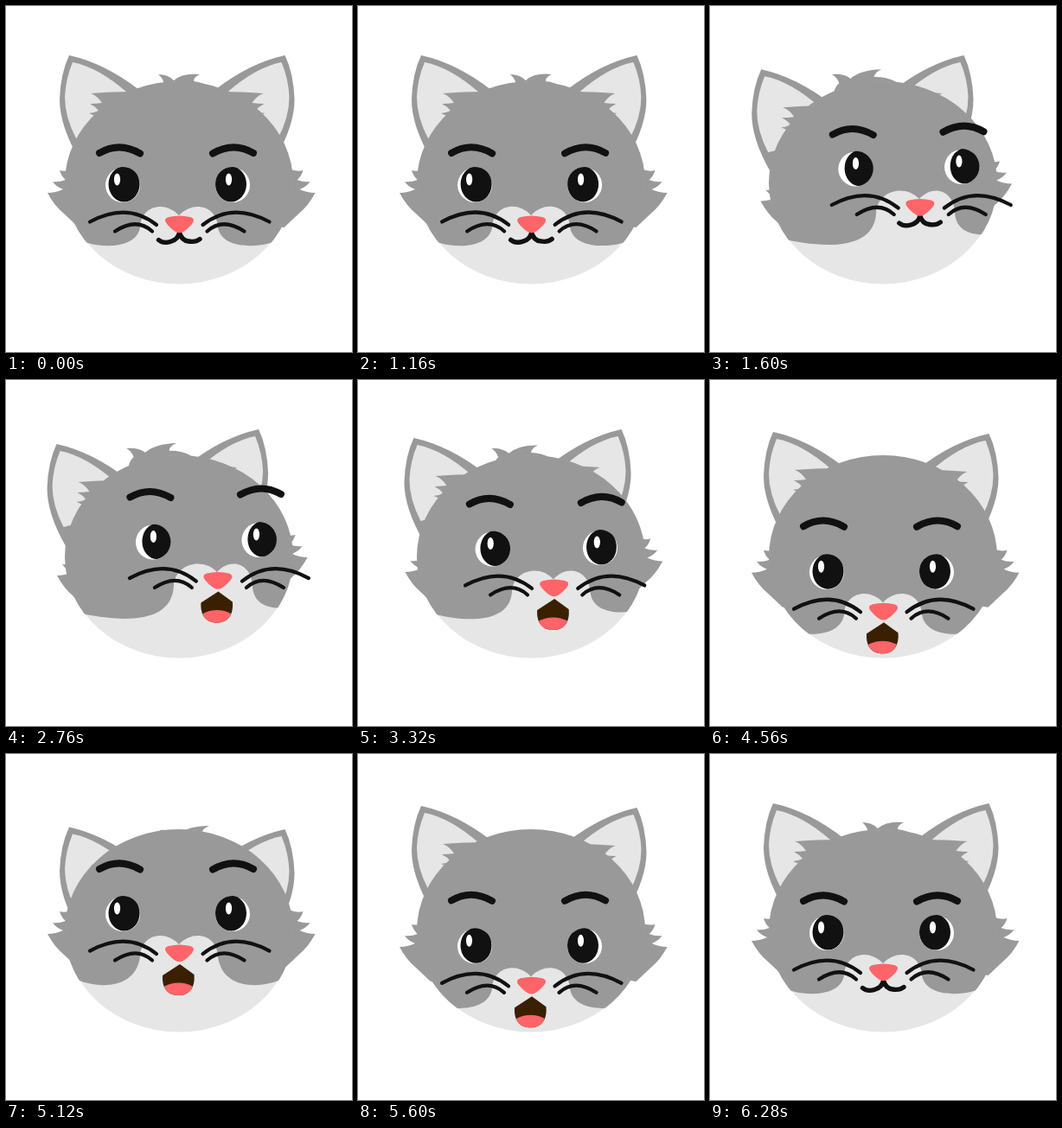
Recreate the animation shown at these times as an HTML page with a canvas. Size 400 by 400 pixels, loop 6.64 s.

```html
<!DOCTYPE html>
<html lang="en">
<head>
<meta charset="utf-8">
<title>Cat</title>
<style>
html, body { margin: 0; width: 100%; height: 100%; overflow: hidden; background: #fff; }
canvas { display: block; width: 100vmin; height: 100vmin; }
</style>
</head>
<body>
<canvas id="stage"></canvas>
<script>
const canvas = document.getElementById('stage');
const ctx = canvas.getContext('2d');
const LOOP = 6640, STEP = 40;
const GREY = '#999', LIGHT = '#e6e6e6', BLACK = '#111', PINK = '#ff6468', DARK = '#3a2000';

const clamp = v => Math.min(1, Math.max(0, v));
const smooth = p => p * p * (3 - 2 * p);
const cubic = p => p < 0.5 ? 4 * p ** 3 : 1 - 4 * (1 - p) ** 3;
const easeOut = p => 1 - (1 - p) ** 2;
const span = (t, a, b) => clamp((t - a) / (b - a));
const mix = (a, b, p) => a + (b - a) * p;

// A pose is how far the head is turned right, bent down and raised up
const FRONT = { right: 0, down: 0, up: 0 };
const RIGHT = { ...FRONT, right: 1 };
const DOWN = { ...FRONT, down: 1 };
const UP = { ...FRONT, up: 1 };
const keys = [
  { time: 1100, pose: FRONT },
  { time: 1750, pose: RIGHT, ease: cubic },
  { time: 2720, pose: RIGHT, ease: cubic },
  { time: 4080, pose: FRONT, ease: smooth },
  { time: 4660, pose: DOWN, ease: cubic },
  { time: 5150, pose: UP, ease: cubic },
  { time: 5650, pose: DOWN, ease: cubic },
  { time: 6140, pose: FRONT, ease: cubic }
];
let pose = FRONT;

function poseAt(t) {
  const i = keys.findIndex(k => k.time > t);
  if (i < 1) return FRONT;
  const a = keys[i - 1], b = keys[i], p = b.ease(span(t, a.time, b.time));
  return {
    right: mix(a.pose.right, b.pose.right, p),
    down: mix(a.pose.down, b.pose.down, p),
    up: mix(a.pose.up, b.pose.up, p)
  };
}

// Offset of a part: x and y when turned, y when down, y when up
const shift = (x, y, down = 15.5, up = -22) =>
  [pose.right * x, pose.right * y + pose.down * down + pose.up * up];

function fill(d, color) {
  ctx.fillStyle = color;
  ctx.fill(new Path2D(d));
}
function stroke(d, width) {
  ctx.strokeStyle = BLACK;
  ctx.lineWidth = width;
  ctx.stroke(new Path2D(d));
}
function ellipse(x, y, rx, ry) {
  ctx.beginPath();
  ctx.ellipse(x, y, rx, ry, 0, 0, 7);
}
function oval(x, y, rx, ry, color) {
  ellipse(x, y, rx, ry);
  ctx.fillStyle = color;
  ctx.fill();
}
function at([x, y], draw, flip = 1) {
  ctx.save();
  ctx.translate(x, y);
  ctx.scale(flip, 1);
  draw();
  ctx.restore();
}
const mirror = (axis, [x, y], draw) => at([axis + x, y], draw, -1);

function ear() {
  fill('M73 57 Q114 66 154 97 L150 150 L84 176 Q62 138 62 108 Q63 78 73 57Z', GREY);
  fill('M77 65 Q107 71 140 100 L130 140 L81 153 Q68 128 68 105 Q69 84 77 65Z', LIGHT);
  fill('M150 99 Q120 99 98 101 Q106 104 111 112 Q104 113 97 113 Q103 116 107 121 Q101 124 96 124 L105 128 L130 140Z', GREY);
}
function tuft() {
  fill('M78 188 Q70 192 62 190 Q64 197 69 201 Q61 204 54 203 Q58 209 66 212 Q57 216 48 216 Q56 231 67 240 L84 256 L120 250Z', GREY);
}
function hair() {
  const { right, down, up } = pose;
  ctx.save();
  ctx.translate(200 - 32 * right + 6 * up, 15 * down + 6.5 * up - 3 * right);
  ctx.transform(1 + 0.2 * (right + up), -0.128 * right - 0.106 * up, 0, 1, 0, 0);
  ctx.translate(-200, 0);
  fill('M178 99 Q180 92 183 90 Q181 83 176 79 Q187 79 194 86 Q204 77 224 79 Q217 82 217 87 Q228 88 238 95 L226 104Z', GREY);
  ctx.restore();
}

// Grey mask: two cheek lobes that meet the muzzle above the nose
function head() {
  const { right, down, up } = pose;
  const [dx, dy] = shift(44, -20);
  const x = 200 + dx, y = 242 + dy;
  const lobe = y + 14 + 2 * right, low = 277 + 17 * down - 9 * up;
  const left = 155 + 39 * right, far = 245 + 40 * right;
  const side = low - 9, drop = low + 7;
  oval(200, 204.5, 131.5, 117, LIGHT);
  ctx.save();
  ellipse(200, 204.5, 132, 117.5);
  ctx.clip();
  ctx.beginPath();
  ctx.moveTo(0, side);
  ctx.lineTo(79, side);
  ctx.bezierCurveTo(100 + 30 * right, low + 3, left - 5 + 3 * right, drop, left, lobe);
  ctx.bezierCurveTo(left + 1, lobe - 25, x - 17, y - 18, x, y);
  ctx.bezierCurveTo(x + 17, y - 18, far - 1, lobe - 25, far, lobe);
  ctx.bezierCurveTo(far + 5 - 4 * right, drop - 27 * right, 300, low + 3 - 12 * right, 321 + 14 * right, side - 6 * right);
  ctx.lineTo(400, side);
  ctx.lineTo(400, 0);
  ctx.lineTo(0, 0);
  ctx.fillStyle = GREY;
  ctx.fill();
  ctx.restore();
}
function eye(x, pupil, glint) {
  oval(x, 207, 20, 20, '#fff');
  ctx.save();
  ellipse(x, 206.5, 20.5, 20.5);
  ctx.clip();
  oval(x + pupil, 206, 18 - pose.right, 20.5, BLACK);
  ctx.restore();
  oval(x + glint, 200.5, 3.6, 7, '#fff');
}
function whiskers() {
  stroke('M97 249.5 Q140 226 174 253', 4.2);
  stroke('M126 260.5 Q151 244 169 260.5', 4.2);
}
function brow() {
  stroke('M108 170 Q131 156.500 155 170.500', 8);
}
function smile() {
  stroke('M176.500 270.500 Q182 275 190 272.500 Q199 270 200.500 262 Q203 271 211 272 Q219 273.500 224 269.500', 5.4);
}
function mouth(open) {
  if (open < 0.15) return smile();
  ctx.save();
  ctx.translate(200, 265);
  ctx.scale(0.6 + 0.4 * open, open);
  ctx.translate(-200, -265);
  const shape = 'M201 265 L217.500 277 C219 293 211 301 199.500 301 C188 301 180 294 181 278Z';
  fill(shape, DARK);
  ctx.clip(new Path2D(shape));
  oval(199.5, 299, 22, 12.5, PINK);
  ctx.restore();
}
function nose() {
  fill('M188 244 Q200.500 241 213 244 Q220 246 215 252 Q209 259 204 261.500 Q200.500 263 197 261.500 Q192 259 186 252 Q181 246 188 244Z', PINK);
}

function draw(t) {
  pose = poseAt(t);
  const { right } = pose;
  const open = easeOut(span(t, 2080, 2360)) - easeOut(span(t, 6020, 6280));
  const lift = (15 - 3 * right) * open;
  const raise = ([x, y]) => [x, y - lift];
  ctx.fillStyle = '#fff';
  ctx.fillRect(0, 0, 400, 400);
  ctx.lineCap = ctx.lineJoin = 'round';

  at(shift(-14.5, 17, 3, 27.5), ear);
  mirror(395.5, shift(-30.5, 0, 5, 30), ear);
  at(shift(11, 10, 7, -8), tuft);
  mirror(405.5, shift(-9, -11, 7, -8), tuft);
  hair();
  head();
  at(shift(35, -19.5), () => eye(135, 1.5 + 3 * right, 7 * right - 6.5));
  at(shift(30.5, -22), () => eye(262, 6 * right - 2, 1.5 * right - 4.5));
  at(raise(shift(35.5, -22.5, 14.5)), brow);
  mirror(394, raise(shift(32, -26, 14.5)), brow);
  at(shift(44.5, -20.5), () => { mouth(open); nose(); });
  at(shift(46, -20.5), whiskers);
  mirror(401.5, shift(45.5, -20.5), whiskers);
}

function frame(now) {
  const size = Math.round(Math.min(innerWidth, innerHeight) * (devicePixelRatio || 1)) || 400;
  if (canvas.width !== size) canvas.width = canvas.height = size;
  ctx.setTransform(size / 400, 0, 0, size / 400, 0, 0);
  draw(Math.floor((now % LOOP) / STEP) * STEP);
  requestAnimationFrame(frame);
}
frame(0);
</script>
</body>
</html>
```
